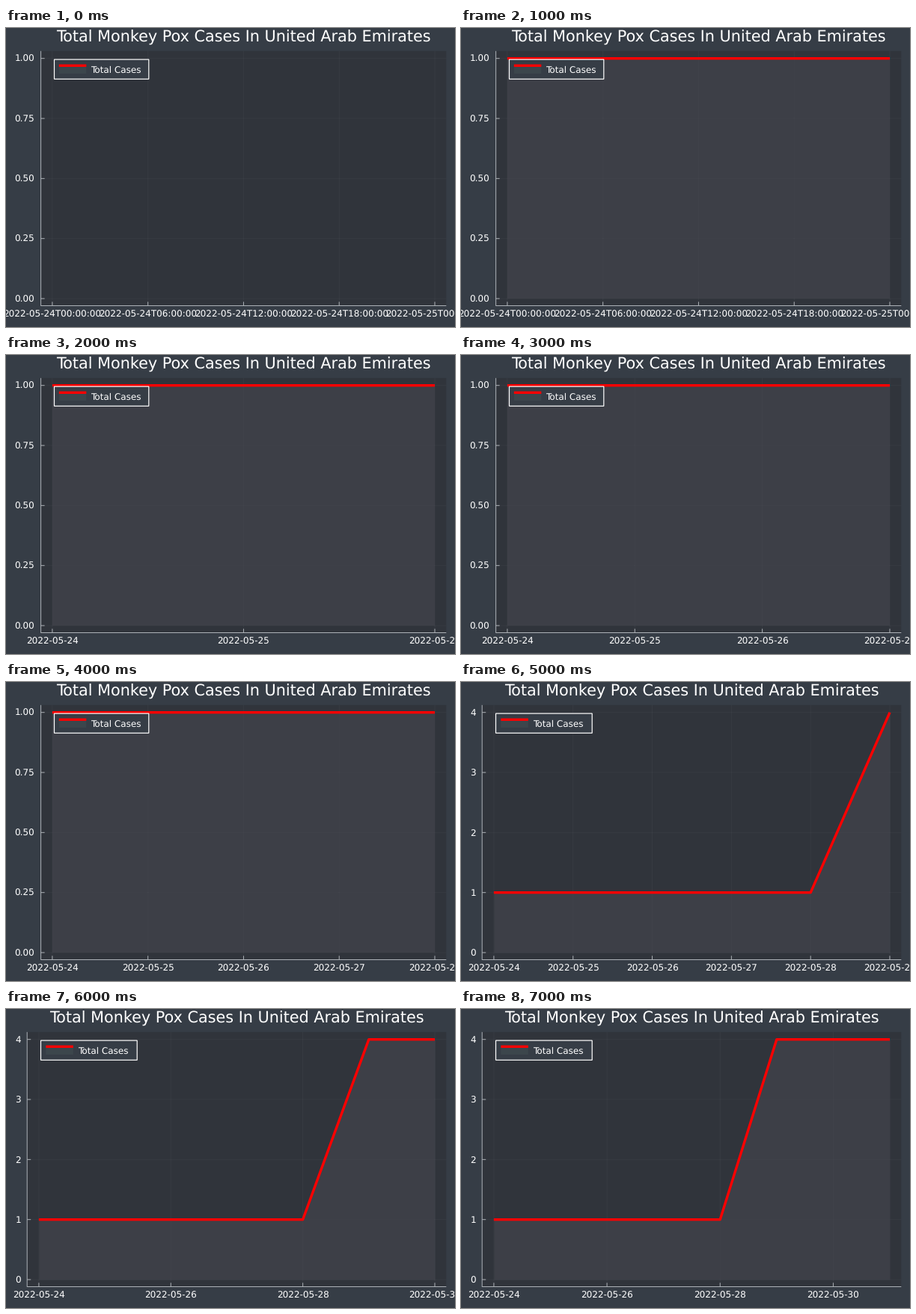
These frames come from a looping animation (600 px wide and 400 px high, 8 s). A matplotlib script:

```python
import matplotlib.pyplot as plt
from matplotlib.animation import FuncAnimation
from matplotlib.patches import Rectangle

W, H, DPI = 600, 400, 100
PX = 72 / DPI  # one pixel in points
PAGE, INSIDE = "#363d46", "#30343b"
AXIS, TEXT, RED = "#adb2b7", "#ffffff", "#ff0000"
RIGHT, TOP, BOTTOM = 588.3, 30.8, 371.5
Y_LOW, Y_HIGH = 362.0, 40.7
CASES = [1, 1, 1, 1, 1, 4, 4, 4]

plt.rcParams["text.hinting"] = "none"
fig = plt.figure(figsize=(W / DPI, H / DPI), dpi=DPI, facecolor=PAGE)
ax = fig.add_axes([0, 0, 1, 1])


def line(xs, ys, color, width=1.0, **kw):
    ax.plot(xs, ys, color=color, lw=width * PX, snap=False,
            solid_capstyle="butt", **kw)


def box(x0, y0, x1, y1, face, edge="none", **kw):
    ax.add_patch(Rectangle((x0, y0), x1 - x0, y1 - y0, facecolor=face,
                           edgecolor=edge, lw=1.2 * PX, snap=False, **kw))


def label(x, y, text, size=12, ha="center"):
    ax.text(x, y, text, size=size * PX, color=TEXT, ha=ha, va="baseline",
            family="DejaVu Sans", zorder=8)


def x_ticks(last):
    """Day offset and label of every tick for a chart ending on day `last`."""
    if last <= 1:
        return [(i / 4, f"2022-05-{24 + i // 4}T{i % 4 * 6:02d}:00:00")
                for i in range(5)]
    step = 1 if last < 6 else 2
    return [(d, f"2022-05-{24 + d}") for d in range(0, last + 1, step)]


def y_ticks(top):
    if top == 1:
        return [(i / 4, f"{i / 4:.2f}") for i in range(5)]
    return [(i, str(i)) for i in range(top + 1)]


def legend(x, width, key, text_x):
    box(x, 42.1, x + width, 68.3, PAGE, TEXT, zorder=5)
    box(key, 50, key + 36.5, 61, "#3c464c", zorder=6)
    line([key, key + 36.5], [50.3, 50.3], RED, 3.4, zorder=7)
    label(text_x, 59.8, "Total Cases", ha="left")


def draw(n):
    ax.clear()
    ax.set_xlim(0, W)
    ax.set_ylim(H, 0)
    ax.axis("off")

    cases = CASES[:n + 1]
    top, span = max(cases), max(n, 1)
    left, x0 = (46.6, 61.9) if top == 1 else (28.2, 43.9)
    x1 = 573.0

    def to_x(day):
        return x0 + (x1 - x0) * day / span

    def to_y(value):
        return Y_LOW + (Y_HIGH - Y_LOW) * value / top

    box(left, TOP, RIGHT, BOTTOM, INSIDE, zorder=0)
    grid = dict(color=AXIS, alpha=0.06, zorder=1)
    for day, text in x_ticks(n):
        x = to_x(day)
        line([x, x], [TOP, BOTTOM], **grid)
        line([x, x], [366.3, BOTTOM], AXIS, zorder=2)
        label(x, 387.3, text)
    for value, text in y_ticks(top):
        y = to_y(value)
        line([left, RIGHT], [y, y], **grid)
        line([left, left + 5], [y, y], AXIS, zorder=2)
        label(left - 8.2, y + 4.4, text, ha="right")
    line([left, left, RIGHT], [TOP, BOTTOM, BOTTOM], AXIS, zorder=2)

    if n > 0:
        xs = [to_x(d) for d in range(n + 1)]
        ys = [to_y(c) for c in cases]
        ax.fill_between(xs, ys, Y_LOW, color="#4a4a53", alpha=0.5, lw=0,
                        zorder=3)
        line(xs, ys, RED, 3.4, solid_joinstyle="round", zorder=4)

    if top == 1:
        legend(64.5, 126.3, 70.8, 113)
    else:
        legend(46.5, 128.7, 53.3, 96.5)
    label((left + RIGHT) / 2 + 0.2, 19.0,
          "Total Monkey Pox Cases In United Arab Emirates", 20.8)
    return ax.get_children()


anim = FuncAnimation(fig, draw, frames=len(CASES), init_func=lambda: draw(0),
                     interval=1000, repeat=True, repeat_delay=0)
plt.show()
```
